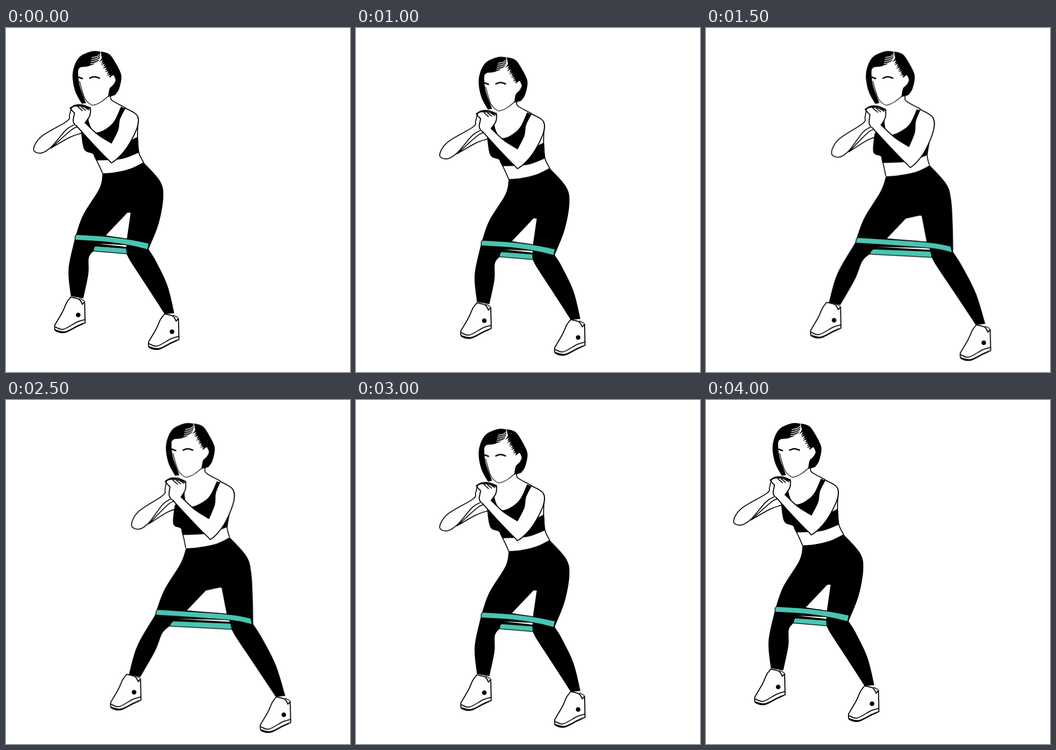
Recreate the animation shown at these times as an HTML page. Size 748x748 px, loop 4.5 s.

```html
<!DOCTYPE html>
<html lang="en">
<head>
<meta charset="utf-8">
<title>Banded side steps</title>
<style>
  html, body { margin: 0; width: 100%; height: 100%; overflow: hidden; background: #fff; }
  svg { display: block; width: 100vw; height: 100vh; }
  path { stroke-linecap: round; stroke-linejoin: round; }
  .ink { fill: #000; }
  .skin { fill: #fff; stroke: #000; stroke-width: 2.2; }
  .line { fill: none; stroke: #000; stroke-width: 2; }
  .fine { fill: none; stroke: #000; stroke-width: 1.4; }
  .bold { fill: none; stroke: #000; stroke-width: 3; }
  .streak { fill: none; stroke: #fff; stroke-width: 1.5; }
  .gap { fill: #fff; }
  .band { fill: #4bc4b1; stroke: #000; stroke-width: 1.5; }

  #narrow { animation: narrow 4500ms step-end infinite; }
  #wide { animation: wide 4500ms step-end infinite; }
  @keyframes narrow {
    0%, 88.888% { opacity: 1; transform: translate(0, 0); }
    11.111%, 33.333%, 55.555%, 77.777% { opacity: 0; }
    22.222%, 66.666% { opacity: 1; transform: translate(122px, 12.5px); }
    44.444% { opacity: 1; transform: translate(243px, 25px); }
  }
  @keyframes wide {
    0%, 22.222%, 44.444%, 66.666%, 88.888% { opacity: 0; }
    11.111%, 77.777% { opacity: 1; transform: translate(0, 0); }
    33.333%, 55.555% { opacity: 1; transform: translate(121.5px, 11.5px); }
  }
</style>
</head>
<body>
<svg viewBox="0 0 748 748">
  <g id="narrow"></g>
  <g id="wide"></g>
</svg>
<script>
const stay = (x, y) => [x, y];
const above = (y, limit) => Math.max(0, y - limit);

// Each pose moves the points of the narrow stance by a rule per body part.
const narrow = { head: stay, arms: stay, torso: stay, legs: stay, rightShoe: [204, 36.5] };
const wide = {
  head: (x, y) => [x + 81.5, y - 11.5],
  arms: (x, y) => [x + 73 + 0.07 * y, y * 1.06 - 19],
  torso: (x, y) => [x + 87 - above(y, 205) / 4, y - 6],
  legs(x, y) {
    const shin = above(y, 481);
    if (x < 262) {
      return [x + Math.min(55, 4 + 0.4 * (585 - y)) + above(340, y) / 5, y - 5 + 0.07 * shin];
    }
    const thigh = above(Math.min(y, 481), 320) / 161;
    return [x + 66 + 40 * thigh ** 2 + 0.1 * shin, y - 5 + 0.12 * shin];
  },
  rightShoe: [325.5, 49],
};

// Smooth curve through "x,y" points; a slash marks a sharp corner.
function curve(text, move) {
  let path = '', start;
  for (const run of text.split('/')) {
    const points = run.trim().split(/\s+/).map(p => move(...p.split(',').map(Number)));
    if (start) points.unshift(start);
    else path = `M${points[0]}`;
    for (let i = 1; i < points.length; i++) {
      const from = points[i - 1], to = points[i];
      const before = points[i - 2] || from, after = points[i + 1] || to;
      const leave = from.map((v, k) => v + (to[k] - before[k]) / 6);
      const arrive = to.map((v, k) => v - (after[k] - from[k]) / 6);
      path += `C${leave} ${arrive} ${to}`;
    }
    start = points.at(-1);
  }
  return path;
}
const pen = move => (kind, text) => `<path class="${kind}" d="${curve(text, move)}"/>`;

function strands(draw) {
  let out = '';
  for (let i = 0; i < 10; i++) {
    const t = i / 9, x = 210 + 18 * t, y = 60 + 38 * t;
    const tipX = x - 8 + (i % 2) * 3, tipY = y + 14 - 5 * t;
    out += draw('ink', `${x},${y - 3} ${x - 2},${y + 6} ${tipX},${tipY} / ${x + 2},${y + 8} ${x + 5},${y + 1}`);
  }
  for (let i = 0; i < 5; i++) {
    const y = 57 + i * 4.5;
    out += draw('streak', `204,${y} ${198 - i},${y + 5} ${187 - i},${y + 7}`);
  }
  return out;
}

const head = draw =>
  draw('fine', '160,116 171,152 184,166 193,167 208,160 224,147') +
  draw('ink', '204,51 185,51 158,65 145,98 150,136 165,165 / 174,163 / 160,124 157,93 163,85 / 183,82 202,70 205,53') +
  draw('ink', '206,51 226,58 243,84 / 251,105 246,132 237,146 / 222,150 / 226,130 238,115 234,103 / 225,109 / 228,98 210,68 206,51') +
  strands(draw) +
  draw('gap', '224,110 234,103 236,119 225,131') +
  draw('bold', '182,109 192,106 203,109') +
  draw('bold', '158,107 166,110');

const backArm = draw =>
  draw('line', '142,173 138,190 132,203 77,236 60,264 76,272 98,259 130,222 147,211') +
  draw('line', '161,214 143,221 98,261 / 138,238 163,229');

const bra = draw =>
  draw('ink', '184,170 180,203 197,227 231,208 250,171 / 259,175 / 262,210 / 274,243 / 287,236 / 289,271 / 250,285 196,288 / 189,274 170,264 163,225 / 172,200') +
  draw('line', '287,205 286,238 289,271 299,292') +
  draw('line', '192,278 202,298 210,316');

const frontArm = draw =>
  draw('skin', '150,209 187,250 223,287 233,291 261,263 285,217 285,190 259,174 / 247,198 243,222 229,250 / 200,232 172,206') +
  draw('line', '228,147 230,157 259,173') +
  draw('skin', '150,211 146,202 149,185 / 142,177 145,171 162,170 184,176 / 182,191 172,206') +
  draw('bold', '140,174 152,168 167,168 183,174') +
  [0, 1, 2].map(i => draw('line', `${156 + 8 * i},${171 + i} ${166 + 7 * i},${180 - i}`)).join('');

const legs = draw =>
  draw('ink', '210,316 236,314 270,306 299,292 / 335,333 342,368 332,425 310,481 / 326,507 351,560 366,620 / 345,622 / 305,560 273,511 263,493 / 262,490 / 190,485 / 180,500 179,535 168,588 / 141,583 / 136,525 149,461 / 167,408 203,349 210,316') +
  draw('gap', '217,451 / 258,408 / 264,402 271,402 / 263,458 / 217,451') +
  draw('gap', '199,469 / 262,472 / 262,476 / 199,469') +
  draw('band', '194,474 / 262,479 / 263,491 / 190,485 / 191,478 194,474') +
  draw('band', '153,449 / 215,453 270,460 311,468 / 308,482 / 270,473 215,465 151,461 / 150,454 153,449');

const shoe = draw =>
  draw('skin', '141,585 132,597 123,617 106,646 / 108,658 128,662 155,648 172,641 / 171,595 / 166,601 / 159,590 141,585') +
  draw('line', '107,650 125,655 155,639 172,634') +
  draw('bold', '107,657 128,661 154,649 167,643') +
  draw('fine', '160,588 / 170,593') +
  '<circle cx="157" cy="624" r="5"/>';

const figure = pose =>
  backArm(pen(pose.arms)) + bra(pen(pose.torso)) + frontArm(pen(pose.arms)) +
  head(pen(pose.head)) + legs(pen(pose.legs)) + shoe(pen(stay)) +
  `<g transform="translate(${pose.rightShoe})">${shoe(pen(stay))}</g>`;

document.getElementById('narrow').innerHTML = figure(narrow);
document.getElementById('wide').innerHTML = figure(wide);
</script>
</body>
</html>
```
